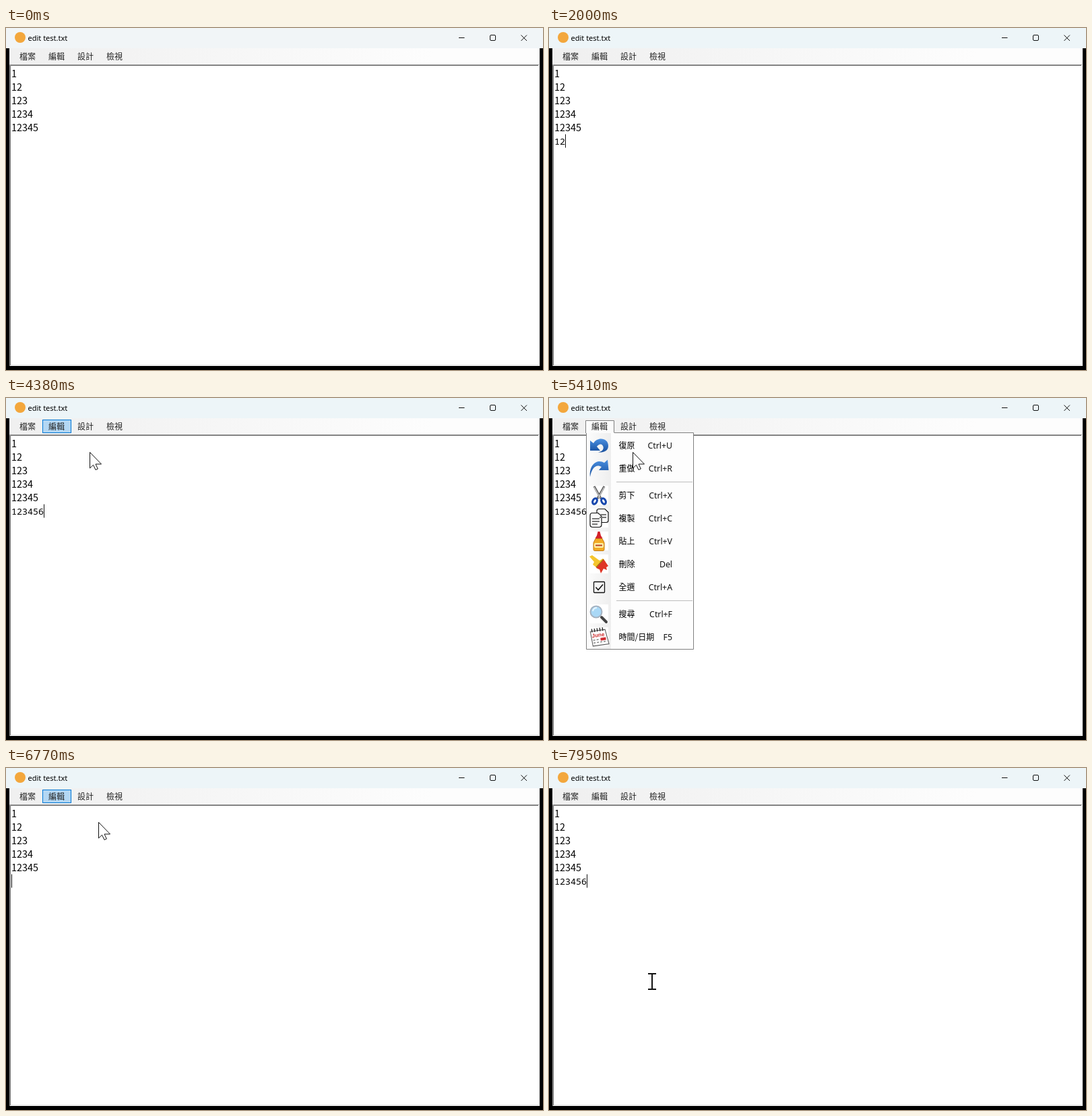
Animation of 797 by 507 pixels, one loop 8000 ms. Source, as an HTML page:

```html
<!DOCTYPE html>
<html lang="zh-Hant">
<head>
<meta charset="utf-8">
<title>edit test.txt</title>
<style>
  html, body { margin: 0; width: 100%; height: 100%; overflow: hidden; background: #000; }
  svg { display: block; }
  text { white-space: pre; }
  .ui { font: 12px "Noto Sans CJK TC", "Noto Sans CJK JP", "Noto Sans CJK SC", "Noto Sans CJK", sans-serif; }
  .bar { font-weight: 500; fill: #222; }
  .keys { font: 12.3px "Noto Sans", sans-serif; text-anchor: end; fill: #111; }
  .title { font: 11px "Noto Sans", sans-serif; }
  .saved { font: 300 14.4px "Noto Sans CJK TC", "Noto Sans CJK JP", "Noto Sans CJK SC", "Noto Sans CJK", sans-serif; }
  .typed { font: 500 13.333px "Noto Sans Mono", monospace; }
  .line { fill: none; stroke: #111; }
  .hot { fill: #b3d7f3; stroke: #0078d7; }
</style>
</head>
<body>
<svg width="797" height="507" viewBox="0 0 797 507">
  <defs>
    <linearGradient id="strip"><stop offset=".05" stop-color="#f0f0f0"/><stop offset=".8" stop-color="#fdfdfd"/></linearGradient>
    <linearGradient id="margin"><stop stop-color="#fcfcfc"/><stop offset="1" stop-color="#eeeeee"/></linearGradient>
    <linearGradient id="blue" x2="0" y2="1"><stop stop-color="#4a8fe0"/><stop offset="1" stop-color="#174f9e"/></linearGradient>
  </defs>

  <!-- window -->
  <rect width="797" height="507"/>
  <rect id="titleBar" width="797" height="30"/>
  <circle cx="21" cy="14" r="8" fill="#f3a73c"/>
  <text class="title" x="32.5" y="19">edit test.txt</text>
  <path class="line" d="M672 14.5h8.500M764.500 10.500l8.500 8.500m0-8.500l-8.500 8.500"/>
  <rect class="line" x="718.500" y="10.500" width="8" height="8" rx="1.500"/>
  <rect x="5" y="30" width="787" height="24" fill="url(#strip)"/>
  <rect x="5" y="54" width="787" height="447" fill="#fff"/>
  <path class="line" stroke="#a0a0a0" d="M5.500 501V54.500H791" style="stroke:#a0a0a0"/>
  <path class="line" d="M6.500 500V55.500H790" style="stroke:#696969"/>
  <path class="line" d="M7 499.500H790.500V56" style="stroke:#e3e3e3"/>

  <!-- document -->
  <g id="document"></g>
  <text id="typed" class="typed" x="8" y="172.500"></text>
  <path id="caret" class="line" d="M.5 157.500v20"/>

  <!-- menu bar -->
  <rect id="headerHot" class="hot" x="54.500" y="32.500" width="42" height="19"/>
  <path id="headerOpen" d="M54.500 52V33.500H96.500V52" fill="#fbfbfb" stroke="#808080"/>
  <g id="bar" class="ui bar"></g>

  <!-- edit menu -->
  <g id="menu">
    <path d="M55.500 52V372.500H214.500V51.500H97" fill="#fdfdfd" stroke="#808080"/>
    <rect x="56" y="52" width="36" height="320" fill="url(#margin)"/>
    <path class="line" d="M100 124.500H213M100 300.500H213" style="stroke:#bdbdbd"/>
    <rect id="itemHot" class="hot" x="57.500" width="155" height="33"/>
    <g id="items" class="ui"></g>
    <g fill="url(#blue)">
      <path d="M61 63L66 67C72 57 88 59 88 71C88 78 82 81 73 80.500C80 79 82 75 80 71C78 67 74 68 71 72L76 78H61Z"/>
      <path d="M61 117C59 97 73 90 82 96L87 91.500L88.500 107H74L78 102C70 97 63 104 61 117Z"/>
    </g>
    <path fill="#fff" d="M60 130h28v28h-28zM60 164h28v28h-28zM60 198h28v28h-28zM60 232h28v28h-28zM60 306h28v28h-28zM60 340h28v28h-28z"/>
    <!-- scissors -->
    <g fill="none" stroke-width="3">
      <path stroke="#555" d="M67 131L77 149M82 131L72 149"/>
      <path stroke="#ddd" stroke-width="1.200" d="M67 132L76 148M82 132L73 148"/>
      <ellipse cx="68" cy="153" rx="3" ry="4.500" stroke="#1747ad" transform="rotate(30 68 153)"/>
      <ellipse cx="81" cy="153" rx="3" ry="4.500" stroke="#1747ad" transform="rotate(-30 81 153)"/>
    </g>
    <!-- copied pages -->
    <g fill="#fafafa" stroke="#111" stroke-width="1.200">
      <path d="M74 164.500h9l5 5v12q0 3-3 3h-11q-3 0-3-3v-14q0-3 3-3z"/>
      <path d="M64 170.500h9l5 5v12q0 4-4 4h-9q-4 0-4-4v-13q0-4 3-4z"/>
      <path stroke="#777" stroke-width="2" d="M75 173h10M75 177h10M64 179h11M64 183h11M64 187h8"/>
    </g>
    <!-- glue -->
    <path fill="#d3222a" d="M72.500 198h3l1.500 6 2.500 4h-11l2.500-4z"/>
    <path fill="#f2ab25" stroke="#c47b13" d="M69 208.500h10l3 6v10q0 2-2 2h-12q-2 0-2-2v-10z"/>
    <rect x="67" y="215" width="14" height="7" rx="2" fill="#fff0a8"/>
    <path stroke="#b9432a" stroke-width="2" d="M69 218.500h10"/>
    <!-- brush -->
    <path fill="#f4c52e" d="M60 235l4-2 11 8 5-3 4 5-10 11-9-7 2-4z"/>
    <path fill="#df3425" d="M81 239l7 10-3 2 1 4-5-2-4 7-2-6-5-2z"/>
    <path stroke="#a56b14" stroke-width="1.500" d="M70 251l11-12"/>
    <!-- check box -->
    <rect class="line" x="66.500" y="272.500" width="16" height="16" rx="1" stroke-width="1.300"/>
    <path class="line" stroke-width="1.500" d="M69.500 280.500l3.500 4 7-8"/>
    <!-- magnifier -->
    <path stroke="#444" stroke-width="4" stroke-linecap="round" d="M78 325l7 7"/>
    <circle cx="70" cy="317" r="8.500" fill="#a9d8f6" stroke="#a5b2c0" stroke-width="2"/>
    <path stroke="#e8f6ff" stroke-width="2" fill="none" d="M65 316q1-5 6-5"/>
    <!-- calendar -->
    <g transform="rotate(-8 74 354)">
      <path fill="#fff" stroke="#555" d="M62.500 344.500h22l3 22h-24z"/>
      <path stroke="#333" stroke-width="1.500" d="M65 341v5M69 341v5M73 341v5M77 341v5M81 341v5"/>
      <text x="64" y="354" fill="#cc2c2c" style="font:bold 8px 'Liberation Sans',sans-serif">June</text>
      <path stroke="#888" stroke-width="1.500" stroke-dasharray="3 2" d="M65 358h8M65 362h18"/>
      <path fill="#d02c30" d="M76 356h8v4h-8z"/>
    </g>
  </g>

  <!-- pointer -->
  <path id="arrow" fill="#fff" stroke="#111" d="M.5.500V24L5.500 19.300 9 26.500 12.300 25 9 18H17.500Z"/>
  <path id="beam" class="line" stroke-width="2" d="M-6-11.500H6M0-11.500V11.500M-6 11.500H6"/>
</svg>
<script>
const LOOP = 8000, STEP = 90;
const $ = id => document.getElementById(id);

function addText(parent, x, y, content, className = "") {
  const node = document.createElementNS("http://www.w3.org/2000/svg", "text");
  node.setAttribute("x", x);
  node.setAttribute("y", y);
  node.setAttribute("class", className);
  node.textContent = content;
  $(parent).append(node);
}

for (let n = 1; n <= 5; n++) addText("document", 8, 53 + 20 * n, "12345".slice(0, n), "saved");
["檔案", "編輯", "設計", "檢視"].forEach((label, i) => addText("bar", 20 + 43 * i, 46.5, label));
[
  [70, "復原", "Ctrl+U"], [104, "重做", "Ctrl+R"], [144, "剪下", "Ctrl+X"],
  [178, "複製", "Ctrl+C"], [212, "貼上", "Ctrl+V"], [246, "刪除", "Del"],
  [280, "全選", "Ctrl+A"], [320, "搜尋", "Ctrl+F"], [354, "時間/日期", "F5"]
].forEach(([y, label, keys]) => {
  addText("items", 103.5, y + 4.5, label);
  addText("items", 183, y + 4.5, keys, "keys");
});

// Pointer path: time, x, y
const path = [
  [90, 382, 7], [180, 370, 40], [450, 250, 160], [720, 115, 275], [810, 102, 285], [900, 98, 286],
  [1540, 98, 285], [3480, 83, 212], [3570, 83, 212], [3750, 215, 120], [3840, 260, 52],
  [4020, 130, 38], [4200, 80, 38], [4290, 123, 80], [4380, 124, 80], [5410, 124, 80],
  [5770, 140, 74], [6230, 140, 74], [6500, 80, 40], [6590, 85, 42], [6770, 137, 80],
  [6950, 137, 80], [7220, 196, 165], [7500, 196, 165], [7950, 153, 316]
];
const moveStarts = [0, 900, 3570, 5410, 6230, 7040, 7590];
const keyTimes = [1720, 2000, 2280, 2560, 2930, 3110];

const within = (t, ...spans) => spans.some(([from, to]) => t >= from && t < to);
const show = (id, on) => $(id).style.display = on ? "" : "none";
const place = (id, x, y) => $(id).setAttribute("transform", `translate(${x} ${y})`);

// The pointer advances in discrete screen refreshes.
function pointerAt(t) {
  const start = moveStarts.filter(s => s <= t).pop();
  const time = start + Math.floor((t - start) / STEP) * STEP;
  const next = path.findIndex(p => p[0] > time);
  if (next === 0) return path[0].slice(1);
  if (next < 0) return path[path.length - 1].slice(1);
  const [t0, x0, y0] = path[next - 1], [t1, x1, y1] = path[next];
  const k = (time - t0) / (t1 - t0);
  return [Math.round(x0 + (x1 - x0) * k), Math.round(y0 + (y1 - y0) * k)];
}

function render(t) {
  const menuOpen = within(t, [5410, 6320], [6860, 7680]);
  const undone = within(t, [6320, 7680]);
  const count = undone ? 0 : keyTimes.filter(k => k <= t).length;

  $("titleBar").setAttribute("fill", t < 90 ? "#f1f5f7" : "#edf5f8");
  $("typed").textContent = "123456".slice(0, count);
  show("caret", t >= 900 && !menuOpen);
  place("caret", 8 + 8 * count, 0);

  show("menu", menuOpen);
  show("headerOpen", menuOpen);
  show("headerHot", within(t, [4110, 5410], [6500, 6860]));
  show("itemHot", within(t, [5500, 6320], [6950, 7680]));
  $("itemHot").setAttribute("y", t < 7040 ? 53.5 : 87.5);

  const [x, y] = pointerAt(t);
  const visible = within(t, [90, 1720], [3570, LOOP]);
  const isArrow = y < 56 || menuOpen || within(t, [4200, 6860]);
  show("arrow", visible && isArrow);
  show("beam", visible && !isArrow);
  place("arrow", x, y);
  place("beam", x, y + 0.5);
}

function tick() {
  render(performance.now() % LOOP);
  requestAnimationFrame(tick);
}
tick();
</script>
</body>
</html>
```
